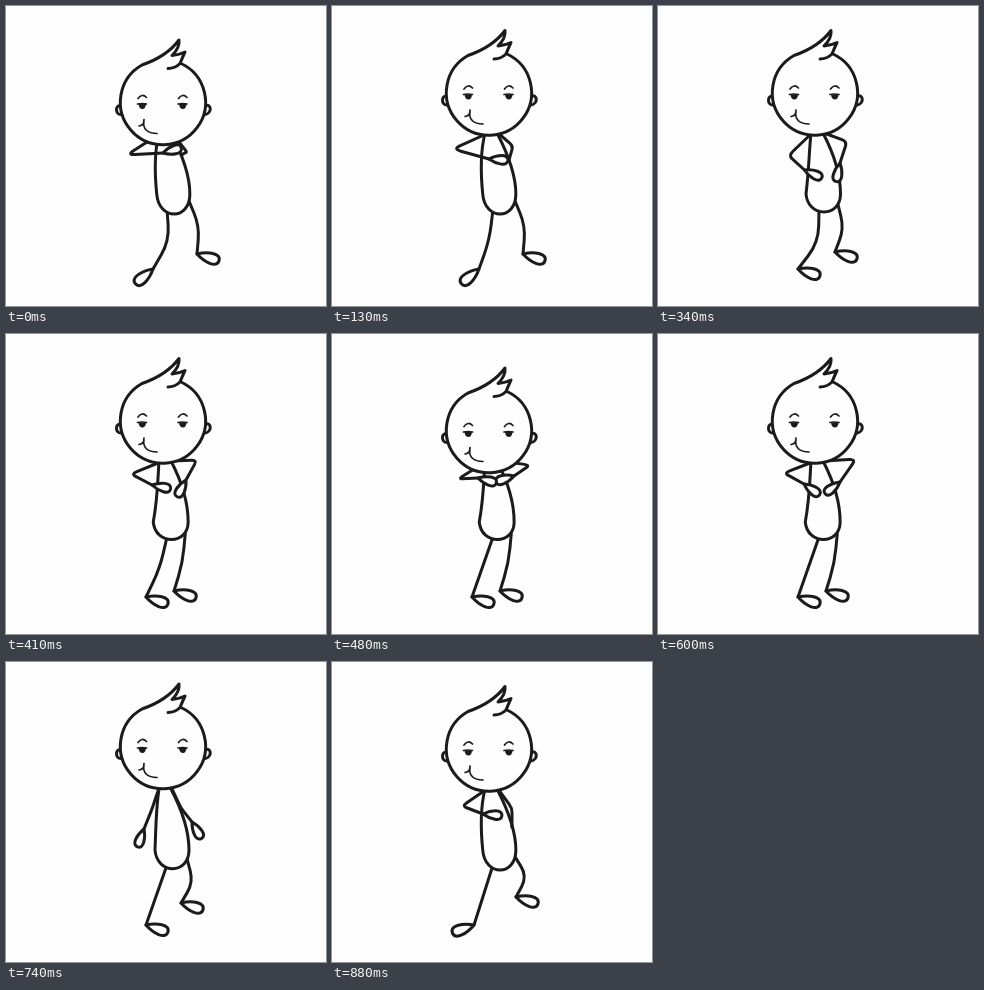
Animation of 320 by 300 pixels, one loop 1000 ms. Source, as an HTML page:

```html
<!DOCTYPE html>
<html lang="en">
<head>
<meta charset="utf-8">
<title>Dancing stick figure</title>
<style>
html, body { margin: 0; height: 100%; overflow: hidden; background: #fefefe; }
svg { display: block; width: 100vw; height: 100vh; }
path { fill: none; stroke: #1c1a1b; stroke-width: 3; stroke-linecap: round; stroke-linejoin: round; }
.skin { fill: #fefefe; }
.thin { stroke-width: 1.7; }
.ink { fill: #1c1a1b; stroke: none; }
</style>
</head>
<body>
<svg viewBox="0 0 320 300">
  <path id="legL"/><path id="footL" class="skin"/>
  <path id="legR"/><path id="footR" class="skin"/>
  <path id="body" class="skin"/>
  <path id="armR"/><path id="handR" class="skin"/>
  <path id="armL"/><path id="handL" class="skin"/>
  <g id="head">
    <path class="skin" d="M115 90C109 89 109 99 115 99M199 90C206 88 206 98 199 99"/>
    <path class="skin" d="M175 48A42.6 42.6 0 1 1 136 49.5C149 45 163 38 173 24.5Q174 32 166 40Q174 39 179 36.5Q176 43 174 48Q169 53 162 53"/>
    <g id="eye">
      <path class="thin" d="M132 83Q136 77.500 140.500 82M131.500 88.500Q136 87.500 140.500 88.500"/>
      <path class="ink" d="M132.500 88.500H140Q139.500 93.500 136.500 93.500Q133 93.500 132.500 88.500"/>
    </g>
    <use href="#eye" x="40.500"/>
    <path class="thin" d="M138 104C136 114 142 118 151 118M133 110.500Q137 110 138 106.500"/>
  </g>
</svg>
<script>
const $ = id => document.getElementById(id);
const shape = (id, d) => $(id).setAttribute("d", d);
const mix = (a, b, k) => a.map((v, i) => v + (b[i] - v) * k);

// Key poses on every second step. Arms: elbow, wrist, hand angle.
const armL = [
  [121, 143, 157, 153, 4], [136, 159, 147, 177, 37], [125, 140, 146, 151, 12],
  [126, 139, 146, 150, 35], [146, 147, 138, 167, 110], [130, 144, 151, 152, 5]];
const armR = [
  [181, 140, 177, 154, 170], [187, 145, 184, 168, 85], [191, 126, 180, 146, 118],
  [198, 125, 182, 148, 142], [175, 146, 186, 160, 60], [180, 146, 180, 165, 90]];
const ankleR = [[191, 248], [186, 235], [168, 257], [168, 257], [175, 241], [184, 235]];

function sample(keys, step) {
  const p = (step - 1) / 2;
  return mix(keys[Math.floor(p)], keys[Math.ceil(p)], p % 1);
}

function bentLine(a, b, c, k) {
  return `M${a}L${mix(a, b, k)}Q${b} ${mix(c, b, k)}L${c}`;
}

function leaf([x, y], angle, size) {
  const a = angle * Math.PI / 180, dx = size * Math.cos(a), dy = size * Math.sin(a);
  const at = (along, side) => [x + dx * along - dy * side, y + dy * along + dx * side];
  return `M${x},${y}C${at(.4, .24)} ${at(1, .36)} ${at(1, 0)}C${at(1, -.36)} ${at(.4, -.24)} ${x},${y}`;
}

function arm(side, root, keys, step, beat, twist, size) {
  const [ex, ey, x, y, angle] = sample(keys, step);
  const wrist = [x, y - 6 * beat];
  shape("arm" + side, bentLine(root, [ex, ey + 6 * beat], wrist, .78));
  shape("hand" + side, leaf(wrist, angle + twist * beat, size));
}

// The knee sits beside the middle of the line from hip to ankle.
function leg(side, hip, ankle, bend, angle) {
  const [dx, dy] = [ankle[0] - hip[0], ankle[1] - hip[1]], len = Math.hypot(dx, dy);
  const knee = [hip[0] + dx / 2 + bend * dy / len, hip[1] + dy / 2 - bend * dx / len];
  shape("leg" + side, bentLine(hip, knee, ankle, .5));
  shape("foot" + side, leaf(ankle, angle, 23));
}

function torso(q) {
  const waist = 148 + 4 * q, l = 151 - 4 * q, r = 184 - 2 * q, low = 215 - 4 * q;
  shape("body", `M153,127C${waist},146 ${waist},164 ${l},188C${l + 2},${low} ${r},${low} ${r},188C${r},170 177,150 165,127`);
}

// Twelve steps; on steps 0 and 6 the head nods over the pose that follows.
function draw(now) {
  const beat = now % 6 ? 0 : 1, step = now + beat;
  const phase = step * Math.PI / 6, sin = Math.sin(phase), cos = Math.cos(phase);
  const turn = Math.min(1, Math.max(0, cos) / .866);
  const squash = (1 - cos) / 2;

  const lift = 2.5 * Math.max(0, 1 - Math.abs(now - 9) / 2);
  $("head").setAttribute("transform", `translate(0 ${9.5 * beat - lift})`);
  torso(squash);

  arm("L", [152, 129], armL, step, beat, -20, 19);
  arm("R", [166, 127], armR, step, beat, 20, 19 * (1 - turn));

  leg("L", [161, 203], [140 + turn * (4.5 + 5 * sin), 263],
    14 * Math.max(0, sin) ** 2 + 6 * beat * turn, 18 + turn * (132 - 20 * sin));
  const foot = sample(ankleR, step);
  leg("R", [183 - 4 * squash, 194 + 6 * squash], foot, 3 + .4 * (257 - foot[1]), 17);
}

// Steps last 70 ms; 0, 6 and 11 are held longer.
function stepAt(t) {
  if (t < 130) return 0;
  return t < 600 ? Math.min(6, Math.floor((t - 60) / 70)) : Math.min(11, Math.floor((t - 110) / 70));
}

function tick() {
  draw(stepAt(performance.now() % 1000));
  requestAnimationFrame(tick);
}
tick();
</script>
</body>
</html>
```
